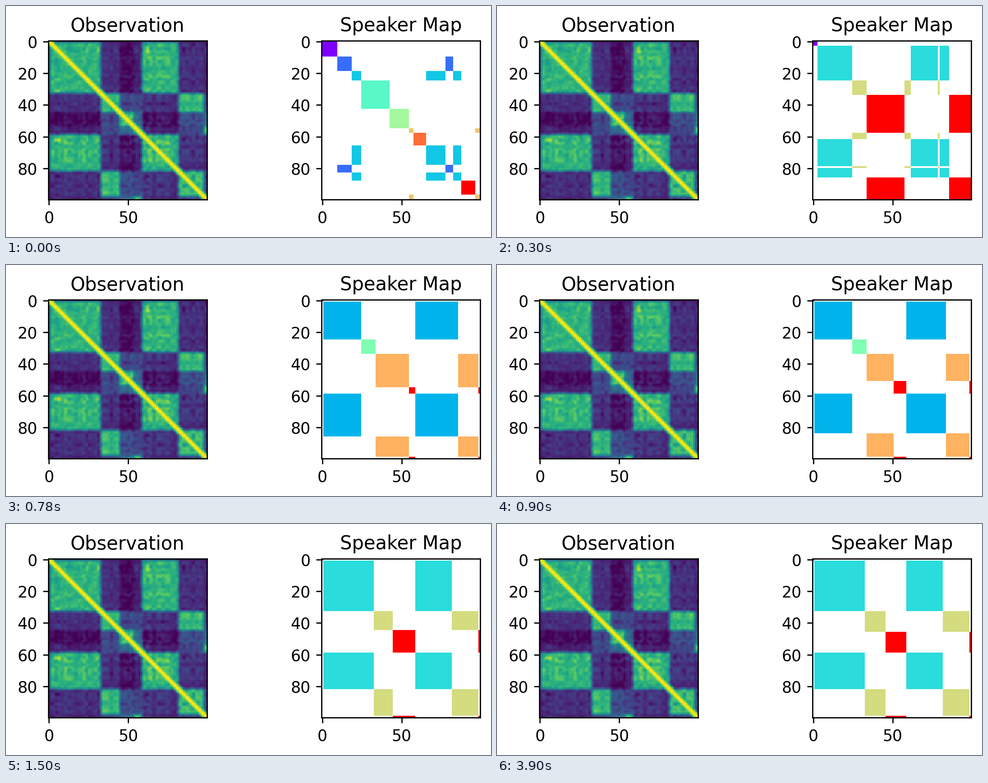
These frames come from a looping animation (1076 px wide and 512 px high, 4 s). A matplotlib script:

```python
import numpy as np
import matplotlib.pyplot as plt
from matplotlib.animation import FuncAnimation

W, H, DPI = 1076, 512, 250
N = 100               # time steps along each axis
LOOP, STEP = 4000, 100
LEFT, BOTTOM, SIDE, PITCH = 93.62, 83.15, 351.95, 606.33

plt.rcParams["font.family"] = "DejaVu Sans"


def turns(speakers, *cuts):
    """One label per time step: a digit per turn, split at the cuts."""
    lengths = np.diff([0, *cuts, N])
    return np.repeat([int(s) for s in speakers], lengths)


def smooth(x):
    """Blend each row with its neighbours in time."""
    p = np.pad(x, ((1, 1), (0, 0)), mode="edge")
    return (p[:-2] + 2 * p[1:-1] + p[2:]) / 4


def observation():
    """Voice similarity between all pairs of time steps."""
    voices = 4
    kin = np.zeros((voices, voices))
    kin[np.triu_indices(voices, 1)] = .14, .03, .10, .22, .21, .38
    kin += kin.T + .67 * np.eye(voices)

    voice = turns("0123013", 1, 33, 45, 54, 59, 82, 98)[:N] if False else \
        turns("0012301" + "3", 1, 33, 45, 54, 59, 82, 98)
    weight = np.eye(voices)[voice]
    weight[0] *= .3   # quiet onset
    weight = smooth(weight)
    sim = weight @ kin @ weight.T

    # Plaid texture, stronger where voices agree
    rng = np.random.default_rng(7)
    e = smooth(rng.normal(size=(N, 4)))
    e /= e.std(axis=0)
    sim += (.012 + .015 * sim) * (e @ e.T + e[:, :1] + e[:, 0])

    # Neighbouring windows overlap, so they always agree
    t = np.arange(N)
    lag = np.abs(t[:, None] - t)
    return np.clip(np.maximum(sim, 1 - .05 * lag ** 2), 0, 1)


def refined(k):
    """Speaker turns after k refinement passes."""
    b_start = 34 if k < 2 else 33
    c_start = 55 - 4 * k if k < 2 else 42 + k
    a_end = max(82, 86 - 2 * k)
    if k < 3:         # the first speaker is still split in two
        return turns("01234134", 1, 25, b_start, c_start, 59, a_end, 99)
    return turns("0123123", 1, b_start, c_start, 59, a_end, 99)


STATES = [
    turns("012345621275", 10, 19, 25, 43, 55, 58, 66, 78, 83, 88, 97),
    turns("012321213", 3, 25, 34, 58, 62, 79, 80, 86),
    *map(refined, range(5)),
]


def state_at(ms):
    """A new state every 300 ms; the last one only closes the loop."""
    last = len(STATES) - 1
    return STATES[last if ms >= LOOP - STEP else min(ms // 300, last - 1)]


def speaker_map(labels):
    return np.where(labels[:, None] == labels, labels / labels.max(), np.nan)


def panel(column, title, data, cmap):
    left = LEFT + column * PITCH
    ax = fig.add_axes([left / W, BOTTOM / H, SIDE / W, SIDE / H])
    ax.set_title(title)
    image = ax.imshow(data, cmap=cmap, vmin=0, vmax=1,
                      interpolation="nearest", aspect="auto")
    ax.set_xticks(range(0, N, 50))
    ax.set_yticks(range(0, N, 20))
    return image


fig = plt.figure(figsize=(W / DPI, H / DPI), dpi=DPI, facecolor="white")
panel(0, "Observation", observation(), "viridis")
image = panel(1, "Speaker Map", speaker_map(STATES[0]), "rainbow")


def update(frame):
    image.set_data(speaker_map(state_at(frame * STEP)))
    return [image]


anim = FuncAnimation(fig, update, frames=LOOP // STEP, interval=STEP,
                     repeat=True, repeat_delay=0)
plt.show()
```
